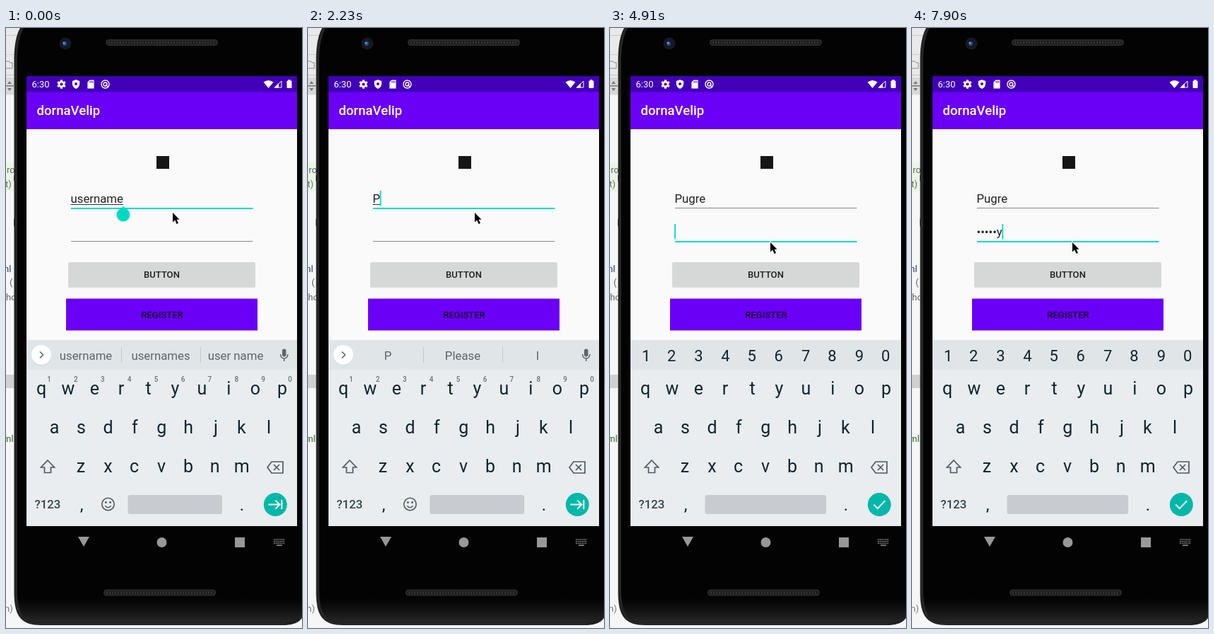
An HTML page with a canvas that plays this animation: 419 px wide and 848 px high, repeating every 8000 ms.

```html
<!DOCTYPE html>
<html lang="en">
<head>
<meta charset="utf-8">
<title>Sign-in form</title>
<style>
html, body { margin: 0; width: 100%; height: 100%; overflow: hidden; background: #f6f6f6; }
canvas { display: block; width: 419px; height: 848px; }
</style>
</head>
<body>
<canvas id="stage" width="419" height="848"></canvas>
<script>
const ctx = document.getElementById('stage').getContext('2d');
const LOOP = 8000;
const PURPLE = '#6a00f6', TEAL = '#00dac5', KEY = '#0f2530', GREY = '#5b656c';

// Each step lists only what changes at that time.
const steps = [
  [0, { name: 'username', pass: '', caret: false, handle: 1, focus: 'name', tools: 0, digits: false,
        words: ['username', 'usernames', 'user name'], mouse: [236, 260] }],
  [300, { caret: true }],
  [590, { name: 'usernam', handle: 0.4 }],
  [740, { handle: 0 }],
  [1030, { name: 'usern' }],
  [1180, { name: 'us' }],
  [1330, { name: '' }],
  [1630, { tools: 0.4 }],
  [1780, { tools: 0.8 }],
  [1930, { tools: 1, caret: false }],
  [2230, { name: 'P', caret: true, tools: 0, words: ['P', 'Please', 'I'] }],
  [2680, { caret: false }],
  [3130, { caret: true }],
  [3420, { name: 'Pu', words: ['Pu', 'Put', 'Pull'] }],
  [3570, { name: 'Pug', words: ['Pug', 'Pugs', 'Probably'] }],
  [3870, { name: 'Pugr', words: ['Pugr', 'Purr', 'Purple'] }],
  [4020, { name: 'Pugre', words: ['Pugre', 'Purge', 'Purged'] }],
  [4320, { mouse: [232, 281] }],
  [4470, { mouse: [227, 302] }],
  [4620, { focus: 'pass', caret: false }],
  [4770, { digits: true }],
  [4910, { caret: true }],
  [5360, { caret: false }],
  [5960, { pass: 'n', caret: true }],
  [6110, { pass: '•u' }],
  [6400, { pass: '••4' }],
  [6700, { pass: '•••7' }],
  [7150, { caret: false }],
  [7450, { pass: '••••e', caret: true }],
  [7900, { pass: '•••••y' }]
];

function stateAt(t) {
  const s = {};
  for (const [at, change] of steps) if (at <= t) Object.assign(s, change);
  return s;
}

function box(x, y, w, h, color, r = 0) {
  ctx.fillStyle = color;
  ctx.beginPath();
  ctx.roundRect(x, y, w, h, r);
  ctx.fill();
}

function disc(x, y, r, color) {
  ctx.fillStyle = color;
  ctx.beginPath();
  ctx.arc(x, y, r, 0, 7);
  ctx.fill();
}

function ring(x, y, r, color, width) {
  ctx.strokeStyle = color;
  ctx.lineWidth = width;
  ctx.beginPath();
  ctx.arc(x, y, r, 0, 7);
  ctx.stroke();
}

function text(str, x, y, size, color, align = 'left', weight = 400) {
  ctx.font = `${weight} ${size}px Roboto, sans-serif`;
  ctx.textAlign = align;
  ctx.fillStyle = color;
  ctx.fillText(str, x, y);
}

function fillPath(d, color, x = 0, y = 0) {
  ctx.save();
  ctx.translate(x, y);
  ctx.fillStyle = color;
  ctx.fill(new Path2D(d));
  ctx.restore();
}

function strokePath(d, color, width, x = 0, y = 0) {
  ctx.save();
  ctx.translate(x, y);
  ctx.strokeStyle = color;
  ctx.lineWidth = width;
  ctx.stroke(new Path2D(d));
  ctx.restore();
}

function gear(x, y, r, color, hole) {
  for (let i = 0; i < 6; i++) {
    ctx.save();
    ctx.translate(x, y);
    ctx.rotate(i * Math.PI / 3);
    box(-r * 0.25, -r, r * 0.5, r, color);
    ctx.restore();
  }
  disc(x, y, r * 0.75, color);
  disc(x, y, r * 0.34, hole);
}

function drawDesktop() {
  box(0, 0, 419, 848, '#f6f6f6');
  box(0, 0, 24, 95, '#e9e9e9');
  box(0, 10, 20, 1, '#c8c8c8');
  box(0, 37, 14, 1, '#d0d0d0');
  strokePath('M0 47H4L6 49H9V57H0', '#8a8a8a', 1);
  box(0, 66, 14, 1, '#c4c4c4');
  box(0, 70, 11, 24, '#d8d8d8');
  box(0, 81, 11, 1.5, '#777');
  fillPath('M2 79L5 75L8 79ZM2 85L5 89L8 85Z', '#777');
  box(0, 190, 14, 41, '#e9f6e4');
  box(0, 490, 14, 19, '#d0d0d0');
  text('ro', 1, 205, 13, '#666');
  text('t)', -1, 225, 13, '#666');
  text('nl', -3, 345, 13, '#203a80');
  text('(', 5, 364, 13, '#666');
  text('ho', 0, 385, 13, '#666');
  text('ml', -4, 585, 13, '#2c6b2c');
  text('n)', -2, 825, 13, '#777');
}

function speaker(x, y) {
  box(x, y, 159, 9, '#2b2b2b', 4.5);
  box(x + 2, y + 2, 155, 5, '#1c1c1c', 2.5);
  for (let i = 0; i < 38; i++) box(x + 4 + i * 4, y + 3, 2, 3, '#343434');
}

function drawPhone() {
  const shade = ctx.createLinearGradient(0, 806, 0, 844);
  shade.addColorStop(0, '#030303');
  shade.addColorStop(0.5, '#141414');
  shade.addColorStop(1, '#2c2c2c');
  fillPath('M20 0Q12 14 11.5 42V800C12 832 22 844 50 844H396Q413 843 419 834V0Z', '#1f1f20');
  fillPath('M25 0Q17 14 16 42V798C17 828 26 840 52 840H394Q411 839 419 828V0Z', shade);
  strokePath('M23 0Q15 14 14 42V799C15 830 24 842 50 842H395', '#303032', 1);
  box(11, 207, 5, 10, '#29292a', 2);
  box(11, 269, 5, 12, '#29292a', 2);
  disc(84, 22, 8.5, '#17191d');
  disc(84, 22, 5.5, '#0f1b36');
  disc(83, 22, 2.8, '#35538d');
  disc(82, 21, 1.2, '#8da7d4');
  speaker(141, 16);
  speaker(138, 793.5);
  fillPath('M102 719H118L110 733Z', '#989898');
  disc(220.5, 727, 7, '#989898');
  box(324, 720, 14, 14, '#989898');
  for (let row = 0; row < 3; row++)
    for (let i = 0; i < 6; i++) box(379 + i * 2.7, 722 + row * 2.8, 1.6, 1.6, '#858585');
  box(383, 730.4, 8, 1.6, '#858585');
}

function drawStatusBar() {
  box(29, 68, 383, 22.5, '#4100b7');
  text('6:30', 36.5, 84, 13, '#fff');
  gear(78.5, 79.5, 6.2, '#fff', '#4100b7');
  fillPath('M0 -6.5L5.2 -4.4V-.5Q4.8 4.4 0 6.5Q-4.8 4.4 -5.2 -.5V-4.4Z', '#fff', 99, 79.5);
  disc(99, 79, 2, '#4100b7');
  fillPath('M-1.6 -6H4.6V6H-4.6V-3Z', '#fff', 120, 79.5);
  for (let i = 0; i < 3; i++) box(118.4 + i * 2, 75, 1, 2.6, '#4100b7');
  ring(140.5, 79.5, 5.5, '#fff', 1.4);
  ring(140.5, 79.5, 2.5, '#fff', 1.3);
  strokePath('M141 80L145 84', '#fff', 1.4);
  fillPath('M364.5 76.5Q371.5 71.5 378.5 76.5L371.5 85Z', '#fff');
  strokePath('M380.5 84H390V75Z', '#fff', 1);
  fillPath('M379.5 84.5L386 78V84.5Z', '#fff');
  box(397.5, 74.5, 7, 10.5, '#fff', 1);
  box(399.5, 73, 3, 2, '#fff');
}

function drawForm(s) {
  box(29, 142, 383, 300, '#fafafa');
  box(29, 90, 383, 53, PURPLE);
  text('dornaVelip', 43.5, 123, 18.6, '#fff', 'left', 500);
  box(213, 181, 18, 18, '#161616');

  const onName = s.focus === 'name';
  fieldLine(254, onName);
  fieldLine(301, !onName);
  const nameEnd = field(s.name, 247);
  const passEnd = field(s.pass, 294);
  if (onName && s.name) box(91.5, 249, nameEnd - 91.5, 1, '#333');
  if (s.caret) box((onName ? nameEnd : passEnd) - 0.3, onName ? 230 : 277, 1.8, 21.5, TEAL);
  if (s.handle) {
    ctx.globalAlpha = s.handle;
    fillPath('M166 252L172.8 257.4A9.5 9.5 0 1 1 159.2 257.4Z', TEAL);
    ctx.globalAlpha = 1;
  }

  box(88, 332, 265, 35.5, '#e3e3e3', 2);
  box(88, 331, 265, 35, '#d6d7d7', 2);
  text('BUTTON', 220.5, 353, 13.05, '#202020', 'center', 500);
  box(85, 382.5, 271, 45, PURPLE);
  text('REGISTER', 221, 410, 13.05, '#16002f', 'center', 500);
}

function fieldLine(y, focused) {
  box(92, y, 257.5, focused ? 2 : 1, focused ? TEAL : '#8a8a8a');
}

function field(str, y) {
  text(str, 91.5, y, 16.78, '#212121');
  return 91.5 + ctx.measureText(str).width;
}

function drawTools(alpha) {
  ctx.globalAlpha = alpha;
  ring(95, 462, 8, GREY, 1.6);
  disc(92, 460, 1.2, GREY);
  disc(98, 460, 1.2, GREY);
  strokePath('M91 464Q95 469 99 464', GREY, 1.4);
  text('GIF', 160, 467, 13, GREY, 'center', 700);
  strokePath('M218 455H232V470H218Z', GREY, 1.7);
  box(221.5, 453, 7, 4, GREY);
  gear(290, 462, 9, GREY, '#e0e5e8');
  for (let i = -1; i < 2; i++) disc(355 + i * 6, 462, 2, GREY);
  ctx.globalAlpha = 1;
}

function drawSuggestions(s) {
  disc(50, 463, 14.3, '#cfd4d7');
  disc(50, 462, 14, '#fff');
  strokePath(s.tools ? 'M52.5 457.5L48 462L52.5 466.5' : 'M48 457.5L52.5 462L48 466.5', '#5a6268', 1.6);
  if (s.tools) drawTools(s.tools);
  else {
    s.words.forEach((w, i) => text(w, 113 + i * 106, 468.5, 16.8, GREY, 'center'));
    box(163, 451, 1, 22, '#c3c9cd');
    box(275, 451, 1, 22, '#c3c9cd');
  }
  box(391, 453.5, 5.5, 11, GREY, 2.7);
  strokePath('M388.5 461Q389 467 393.7 467Q398.5 467 399 461M393.7 467V471', GREY, 1.5);
}

// Keys are centred on the visible glyph, not on its advance width.
function keyRow(keys, x, y, size = 25) {
  ctx.font = `${size}px Roboto, sans-serif`;
  ctx.textAlign = 'left';
  [...keys].forEach((k, i) => {
    const m = ctx.measureText(k);
    const shift = (m.actualBoundingBoxRight - m.actualBoundingBoxLeft) / 2;
    text(k, x + i * 37.9 - shift, y, size, KEY);
  });
}

function drawKeyboard(s) {
  box(29, 441, 383, 263, '#e9edf0');
  box(29, 441, 383, 42, '#e0e5e8');
  if (s.digits) keyRow('1234567890', 49.5, 471, 22);
  else {
    drawSuggestions(s);
    [...'1234567890'].forEach((d, i) => text(d, 61 + i * 37.9, 500, 10, '#68737a', 'center', 500));
  }
  keyRow('qwertyuiop', 50, 518);
  keyRow('asdfghjkl', 68.7, 573);
  keyRow('zxcvbnm', 106.3, 628);

  strokePath('M0 -9L9.5 1H4.5V8.5H-4.5V1H-9.5Z', '#4d5a62', 1.7, 59, 620);
  strokePath('M-11 0L-5 -8H11V8H-5Z M-2 -4L6 4M6 -4L-2 4', '#4d5a62', 1.7, 381, 621);

  text('?123', 59, 679, 16.8, '#37464e', 'center', 500);
  text(',', 107, 682, 24, KEY, 'center');
  text('.', 334, 682, 24, KEY, 'center');
  const left = s.digits ? 134.5 : 172.5;
  box(left, 660, 306 - left, 27, '#c8ccd0', 3);
  if (!s.digits) {
    ring(144.5, 673, 8.7, '#4d5a62', 1.6);
    disc(141.4, 670.5, 1.4, '#4d5a62');
    disc(147.6, 670.5, 1.4, '#4d5a62');
    strokePath('M140.3 675.3Q144.5 680.3 148.7 675.3', '#4d5a62', 1.5);
  }
  disc(381.3, 673.6, 16.5, '#00b8a9');
  strokePath(s.digits ? 'M-8 0L-2.5 5.5L8 -5.5' : 'M-10 0H6M0 -6L6 0L0 6M9 -6.5V6.5', '#fff', 2, 381.3, 673.6);
}

function drawMouse([x, y]) {
  const arrow = 'M0 1V14.5L3.2 11.6L5.6 17L8 16L5.6 10.7H9.6Z';
  strokePath(arrow, '#fff', 2, x, y);
  fillPath(arrow, '#000', x, y);
}

function frame(now) {
  const s = stateAt(now % LOOP);
  drawDesktop();
  drawPhone();
  drawForm(s);
  drawStatusBar();
  drawKeyboard(s);
  drawMouse(s.mouse);
}

const start = performance.now();
function tick() {
  frame(performance.now() - start);
  requestAnimationFrame(tick);
}
tick();
</script>
</body>
</html>
```
